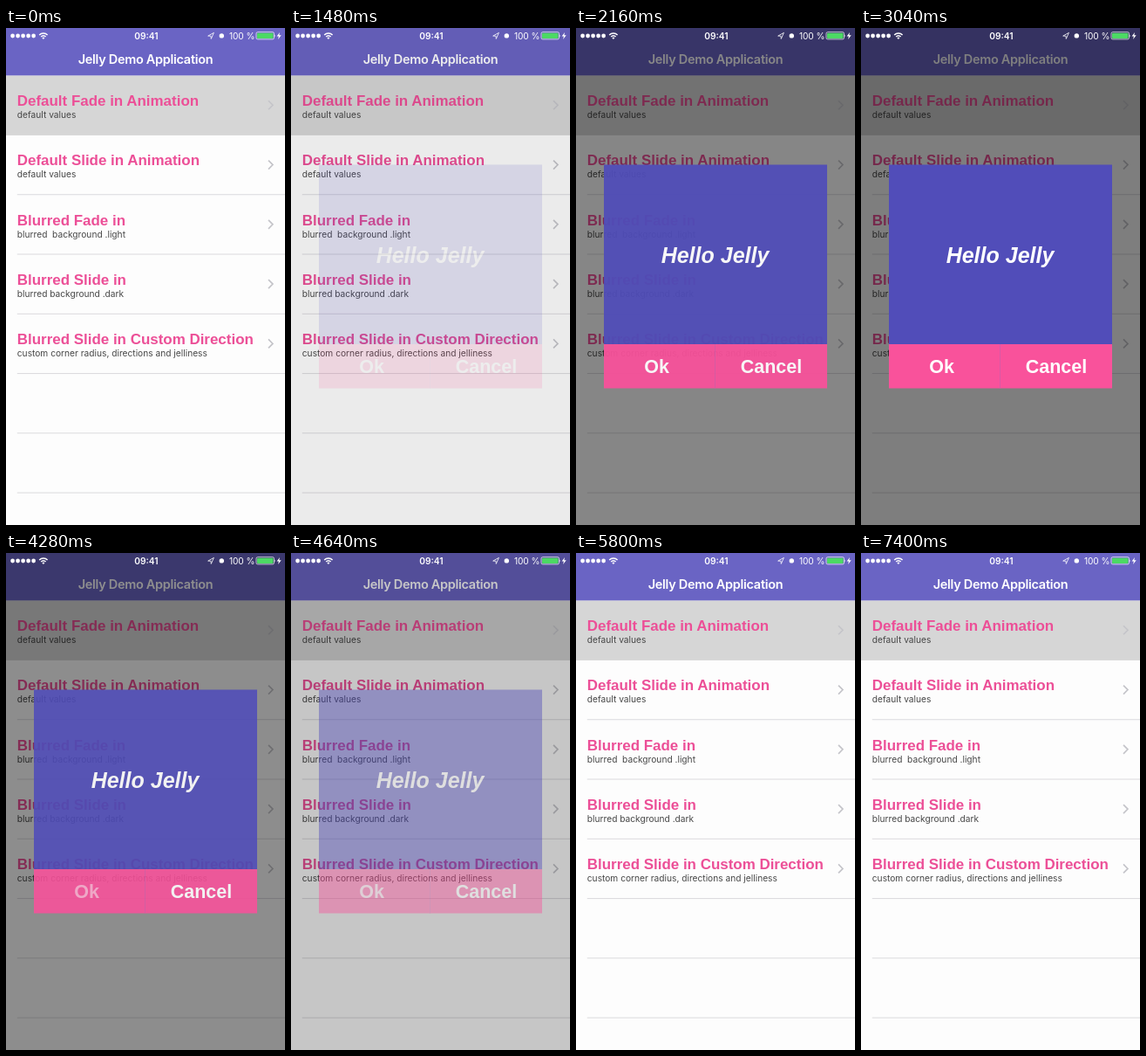
An HTML page that plays this animation: 320x569 px, repeating every 7440 ms.

```html
<!DOCTYPE html>
<html lang="en">
<head>
<meta charset="utf-8">
<title>Jelly Demo Application</title>
<style>
  html, body { margin: 0; width: 100%; height: 100%; overflow: hidden; background: #fdfdfd; }
  svg { display: block; width: 100vw; height: 100vh; }
  text { white-space: pre; }
  .ui { font-family: Inter, Roboto, sans-serif; }
  .head { font: bold 16.95px "Liberation Sans", Arial, sans-serif; fill: #ec4f97; }
  .sub { font-size: 10.2px; fill: #464646; }
  .nav { font-size: 14.5px; font-weight: 600; letter-spacing: -.3px; fill: #fff; }
  .bar { font-size: 10.2px; fill: #fff; }
  .line { stroke: #d2d1d6; stroke-width: .8; }
  .chevron { fill: none; stroke: #c4c4c9; stroke-width: 1.6; }
  .modal text { font: bold 21.5px "Liberation Sans", Arial, sans-serif; fill: #fff; text-anchor: middle; }
  .modal .hello { font-size: 25px; font-style: italic; }
  #dim, #modal { opacity: 0; }
</style>
</head>
<body>
<svg viewBox="0 0 320 569" preserveAspectRatio="none">
  <rect width="320" height="569" fill="#fdfdfd"/>
  <rect width="320" height="54.6" fill="#6a64c4"/>
  <text class="ui nav" x="160" y="41" text-anchor="middle">Jelly Demo Application</text>
  <rect y="54.6" width="320" height="68.3" fill="#d6d6d6"/>
  <g id="list"></g>

  <rect id="dim" width="320" height="569"/>

  <g id="modal" class="modal">
    <rect x="32" y="156.5" width="256" height="206" fill="#514db9"/>
    <rect x="32" y="362" width="256" height="50.5" fill="#f9529b"/>
    <path d="M159.5 362V412.5" stroke="#d65aa6" stroke-width=".9"/>
    <text class="hello" x="159.5" y="269">Hello Jelly</text>
    <text id="ok" x="92.5" y="395">Ok</text>
    <text x="224" y="395">Cancel</text>
  </g>

  <g fill="#fff">
    <g id="signal"></g>
    <g fill="none" stroke="#fff" stroke-width="1.5">
      <path d="M38.2 8A6.6 6.6 0 0 1 47.6 8M40.2 10A3.9 3.9 0 0 1 45.6 10"/>
    </g>
    <path d="M41.4 11.3A2.2 2.2 0 0 1 44.4 11.3L42.9 12.9Z"/>
    <text class="ui bar" x="161" y="12.6" text-anchor="middle" font-weight="600">09:41</text>
    <path d="M231.7 9.1L238.4 5.4L235.3 12.4L235 9.2Z" fill="none" stroke="#fff" stroke-width=".8"/>
    <circle cx="247.3" cy="8.9" r="2.7"/>
    <text class="ui bar" x="256" y="12.6" letter-spacing="-.1">100 %</text>
    <rect x="287" y="4.7" width="20.5" height="8.2" rx="1.7" fill="none" stroke="#fff" stroke-width=".7"/>
    <rect x="288" y="5.7" width="18.5" height="6.2" rx=".9" fill="#4cd964"/>
    <path d="M308.3 7.4Q309.6 8.8 308.3 10.2Z"/>
    <path d="M314 5L310.6 9.5H312.9L312.1 13L315.7 8.2H313.3Z"/>
  </g>
</svg>
<script>
  const LOOP = 7440, ROW = 68.27, TOP = 54.6;
  const $ = id => document.getElementById(id);

  const rows = [
    ["Default Fade in Animation", "default values"],
    ["Default Slide in Animation", "default values"],
    ["Blurred Fade in", "blurred  background .light"],
    ["Blurred Slide in", "blurred background .dark"],
    ["Blurred Slide in Custom Direction", "custom corner radius, directions and jelliness"]
  ];
  const row = ([head, sub], i) => `<g transform="translate(0 ${TOP + i * ROW})">
    <text class="head" x="12.8" y="34.6">${head}</text>
    <text class="ui sub" x="12.8" y="48.4">${sub}</text>
    <path class="chevron" d="M301 28.7L306 33.7L301 38.7"/></g>`;
  const line = i => `<path class="line" d="M12.8 ${TOP + i * ROW - .4}H320"/>`;

  $("list").innerHTML = rows.map(row).join("") + [2, 3, 4, 5, 6, 7].map(line).join("");
  $("signal").innerHTML = [0, 1, 2, 3, 4]
    .map(i => `<circle cx="${7.6 + i * 6}" cy="9" r="2.4"/>`).join("");

  // Steps are [time in ms, opacity]; the easing runs towards the next step.
  function fade(id, steps, easing) {
    const frames = steps.map(([ms, opacity]) => ({ offset: ms / LOOP, opacity, easing }));
    const anim = $(id).animate(frames, { duration: LOOP, iterations: Infinity });
    anim.startTime = 0;
  }
  const shown = peak => [[0, 0], [1170, 0], [2370, peak], [4000, peak], [5200, 0], [LOOP, 0]];

  fade("dim", shown(.5), "ease-in-out");
  fade("modal", shown(1), "ease-in-out");
  fade("ok", [[0, 1], [3720, 1], [3860, .3], [4000, .3], [4900, 1], [LOOP, 1]], "linear");
</script>
</body>
</html>
```
